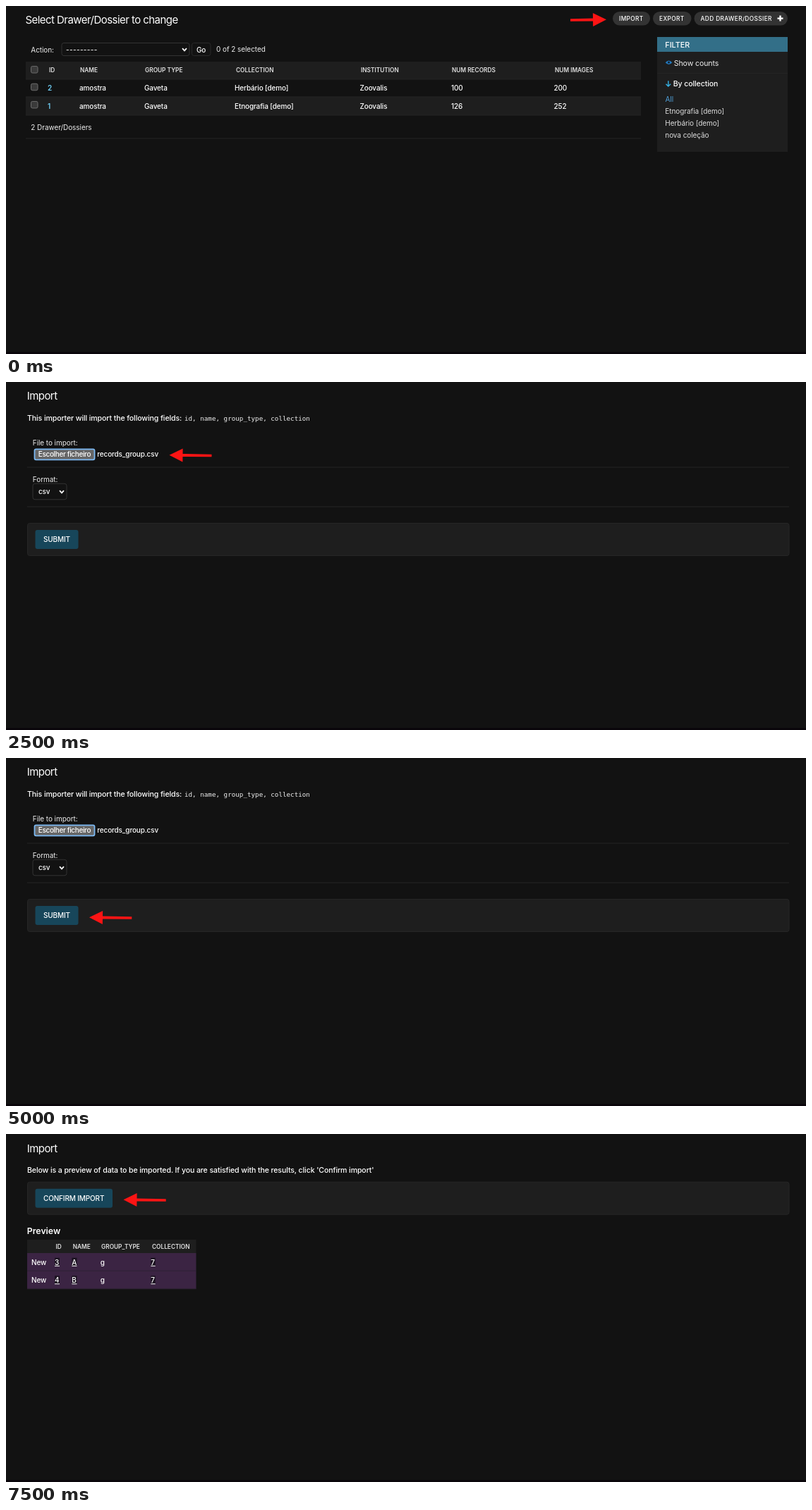
Recreate the animation shown at these times as an HTML page. Size 1134 by 494 pixels, loop 8000 ms.

```html
<!DOCTYPE html>
<html lang="en">
<head>
<meta charset="utf-8">
<title>Import walkthrough</title>
<style>
  html, body { margin: 0; width: 100%; height: 100%; overflow: hidden; background: #121212; }
  svg { display: block; width: 100%; height: 100%; }
  text { font-family: Inter, "Open Sans", sans-serif; fill: #eee; white-space: pre; font-variant-ligatures: none; }
  .title { font-size: 15px; letter-spacing: -.55px; fill: #fff; }
  .lead { font-size: 10.6px; font-weight: 500; letter-spacing: -.12px; fill: #fff; }
  .side { font-size: 10.6px; letter-spacing: -.13px; }
  .body { font-size: 10px; letter-spacing: -.07px; }
  .cell { font-size: 10px; font-weight: 500; letter-spacing: -.15px; fill: #fff; }
  .file { font-size: 10px; font-weight: 500; letter-spacing: -.36px; fill: #fff; }
  .dash { font-size: 10px; font-weight: 500; letter-spacing: .35px; fill: #fff; }
  .head { font-size: 8.3px; font-weight: 600; fill: #e0e0e0; }
  .tool { font-size: 8.3px; font-weight: 500; letter-spacing: .39px; fill: #fff; }
  .bar { font-size: 10.8px; font-weight: 500; fill: #fff; }
  .sub { font-size: 12.3px; font-weight: 600; fill: #fff; }
  .mono { font-family: "DejaVu Sans Mono", monospace; font-size: 9.24px; }
  .medium { font-weight: 500; }
  .bold { font-weight: 600; }
</style>
</head>
<body>
<svg id="stage" viewBox="0 0 1134 494" preserveAspectRatio="none"></svg>
<script>
const SIZES = { title: 15, lead: 10.6, side: 10.6, head: 8.3, tool: 8.3, bar: 10.8, sub: 12.3, mono: 9.24 };
const PANEL = '#1e1e1e', LINE = '#242424', EDGE = '#333', TEAL = '#17465a', RED = '#fc1414';

// Text is placed by its left edge and the middle of its capitals.
function text(x, y, str, style, fill) {
  const size = SIZES[style.split(' ')[0]] || 10;
  const paint = fill ? ` style="fill:${fill}"` : '';
  return `<text x="${x}" y="${(y + size * .36).toFixed(2)}" class="${style}"${paint}>${str}</text>`;
}

function rect(x, y, w, h, fill, r = 0, edge = 'none', weight = 1) {
  return `<rect x="${x}" y="${y}" width="${w}" height="${h}" rx="${r}" fill="${fill}" stroke="${edge}" stroke-width="${weight}"/>`;
}

function stroke(d, color, width) {
  return `<path d="${d}" fill="none" stroke="${color}" stroke-width="${width}"/>`;
}

const rule = (x, y, w) => rect(x, y, w, 1, LINE);
const chevron = (x, y) => stroke(`M${x - 3} ${y - 1.6}l3 3.2l3 -3.2`, '#fff', 1.7);
const checkbox = y => rect(35.5, y - 4.75, 9.5, 9.5, '#3a3a3a', 2, '#6c6c6c');

function arrow(x, y, tailX, tailY) {
  const length = Math.hypot(tailX - x, tailY - y);
  const angle = Math.atan2(tailY - y, tailX - x) * 180 / Math.PI;
  return `<path transform="translate(${x} ${y}) rotate(${angle})" fill="${RED}"
    d="M0 0L19 -9.5V-2L${length} -1.7V1.7L19 2V9.5Z"/>`;
}

function pill(x, w, label) {
  return rect(x, 8, w, 19.5, '#333', 9.75) + text(x + 9, 17.7, label, 'tool');
}

function bar(y, w, label) {
  return rect(30.5, y + .5, 1079.5, 46, PANEL, 3, '#262626')
    + rect(41.5, y + 10, w, 27, TEAL, 3)
    + text(53, y + 23.5, label, 'cell');
}

function listRow(y, id, collection, records, images) {
  const cells = [[104, 'amostra'], [196, 'Gaveta'], [324, collection], [501.5, 'Zoovalis'], [631, records], [776.5, images]];
  return checkbox(y - 1.8) + text(59, y, id, 'cell bold', '#6fcff5')
    + cells.map(([x, str]) => text(x, y, str, 'cell')).join('');
}

function listPage() {
  const heads = [[61, 'ID'], [105, 'NAME'], [197, 'GROUP TYPE'], [326, 'COLLECTION'],
    [503, 'INSTITUTION'], [632, 'NUM RECORDS'], [778, 'NUM IMAGES']];
  const filters = ['Etnografia [demo]', 'Herbário [demo]', 'nova coleção'];
  return text(27.5, 20, 'Select Drawer/Dossier to change', 'title')
    + pill(860, 53, 'IMPORT') + pill(917, 54.5, 'EXPORT') + pill(975.5, 132.5, 'ADD DRAWER/DOSSIER')
    + stroke('M1093.5 17.6h8M1097.5 13.6v8', '#fff', 2.4)
    + text(35.3, 62, 'Action:', 'body')
    + rect(79, 52.5, 181, 18, '#121212', 3, EDGE) + text(85, 62, '---------', 'dash') + chevron(253, 61.8)
    + rect(263.5, 52.5, 26.5, 18, '#121212', 3, '#2a2a2a') + text(270, 62, 'Go', 'cell')
    + text(298, 61.3, '0 of 2 selected', 'body')
    + rect(28, 79, 872, 25, PANEL) + checkbox(90.3)
    + heads.map(([x, str]) => text(x, 91.5, str, 'head')).join('')
    + rule(28, 103.5, 872) + rect(28, 129, 872, 26, PANEL) + rule(28, 128.5, 872) + rule(28, 154.5, 872)
    + listRow(116.8, '2', 'Herbário [demo]', '100', '200')
    + listRow(142, '1', 'Etnografia [demo]', '126', '252')
    + text(35.3, 172, '2 Drawer/Dossiers', 'body') + rule(28, 187.5, 872)
    + rect(923, 44, 185, 163, PANEL) + rect(923, 44, 185, 21, '#336f88')
    + text(934.3, 55, 'FILTER', 'bar')
    + '<path d="M934.7 80.2Q939.5 74.8 944.3 80.2Q939.5 85.6 934.7 80.2Z" fill="#2278bd"/>'
    + '<circle cx="939.5" cy="80" r="1.5" fill="#123"/>'
    + text(946.8, 81, 'Show counts', 'side') + rule(923, 95, 185)
    + stroke('M938.8 106.3v7.6M935.5 110.8l3.3 3.3l3.3 -3.3', '#35b1e4', 1.4)
    + text(945.8, 110.3, 'By collection', 'side medium', '#fff')
    + text(934.5, 132.8, 'All', 'body', '#4f9fd8')
    + filters.map((str, i) => text(934.3, 149.8 + i * 17, str, 'body', '#ddd')).join('');
}

function formPage(chosen) {
  const page = text(29.7, 19.5, 'Import', 'title')
    + text(30, 51, 'This importer will import the following fields:', 'lead')
    + text(253, 51.5, 'id, name, group_type, collection', 'mono')
    + text(37.8, 86, 'File to import:', 'body')
    + rect(40.5, 95.3, 85, 15, '#666', 2, chosen ? '#7cb9f3' : '#666', chosen ? 1.8 : 1)
    + text(45.8, 102.8, 'Escolher ficheiro', 'file')
    + text(129.3, 102.8, chosen ? 'records_group.csv' : 'Nenhum ficheiro selecionado', 'cell')
    + rule(30, 120.5, 1080)
    + text(37.8, 138.3, 'Format:', 'body')
    + rect(38, 144.3, 48, 22.5, '#121212', 3, EDGE)
    + (chosen ? text(46, 155.8, 'csv', 'cell') : text(46, 155.8, '---', 'dash'))
    + chevron(79, 155.8) + rule(30, 176.5, 1080) + bar(200, 61, 'SUBMIT');
  return chosen ? page : `<g transform="translate(-3 -1.6)">${page}</g>`;
}

function previewRow(y, id, name) {
  const added = [[69, id, 7], [93.3, name, 7.2], [205.3, '7', 6.4]];
  return rect(30, y - 13, 239.5, 25.5, '#3b2443') + rect(30, y + 11.8, 239.5, 1, '#2a2030')
    + text(36, y, 'New', 'cell') + text(133.8, y, 'g', 'cell')
    + added.map(([x, str, w]) => rect(x, y - 6.3, w, 12, '#1b1220')
      + text(x, y, str, 'cell') + rect(x, y + 4.8, w, 1, '#fff')).join('');
}

function previewPage() {
  const heads = [[70.5, 'ID'], [94.7, 'NAME'], [135, 'GROUP_TYPE'], [207, 'COLLECTION']];
  return text(29.7, 20.2, 'Import', 'title')
    + text(30, 51.5, "Below is a preview of data to be imported. If you are satisfied with the results, click 'Confirm import'", 'lead')
    + bar(67.7, 109.5, 'CONFIRM IMPORT')
    + text(29.8, 137.3, 'Preview', 'sub')
    + rect(30, 150, 239.5, 19, PANEL)
    + heads.map(([x, str]) => text(x, 160, str, 'head')).join('')
    + previewRow(182, '3', 'A') + previewRow(207.5, '4', 'B');
}

const LOOP = 8000;
// Start time, page, arrow tip and tail
const STEPS = [
  [0, listPage(), [851, 19.3, 800, 20]],
  [500, formPage(false), [133, 117, 174.5, 132]],
  [1750, formPage(true), [231.5, 103.7, 291.5, 104.5]],
  [3000, formPage(true), [103.5, 154.5, 163.5, 155.2]],
  [4250, formPage(true), [118, 226.2, 178.3, 227]],
  [5500, previewPage(), [291.3, 189.2, 351.5, 190]],
  [6750, previewPage(), [166.5, 93.2, 226.7, 94]],
];

const stage = document.getElementById('stage');
stage.innerHTML = rect(0, 0, 1134, 494, '#121212')
  + STEPS.map(([, page, tip]) => `<g class="step" visibility="hidden">${page}${arrow(...tip)}</g>`).join('')
  + rect(0, 491, 1134, 3, '#0a060b');
const groups = [...stage.querySelectorAll('.step')];
let shown = -1;

function draw(now) {
  const t = now % LOOP;
  const next = STEPS.filter(([start]) => start <= t).length - 1;
  if (next !== shown) {
    groups.forEach((g, i) => g.setAttribute('visibility', i === next ? 'visible' : 'hidden'));
    shown = next;
  }
}

const begin = performance.now();
function tick() {
  draw(performance.now() - begin);
  requestAnimationFrame(tick);
}
tick();
</script>
</body>
</html>
```
